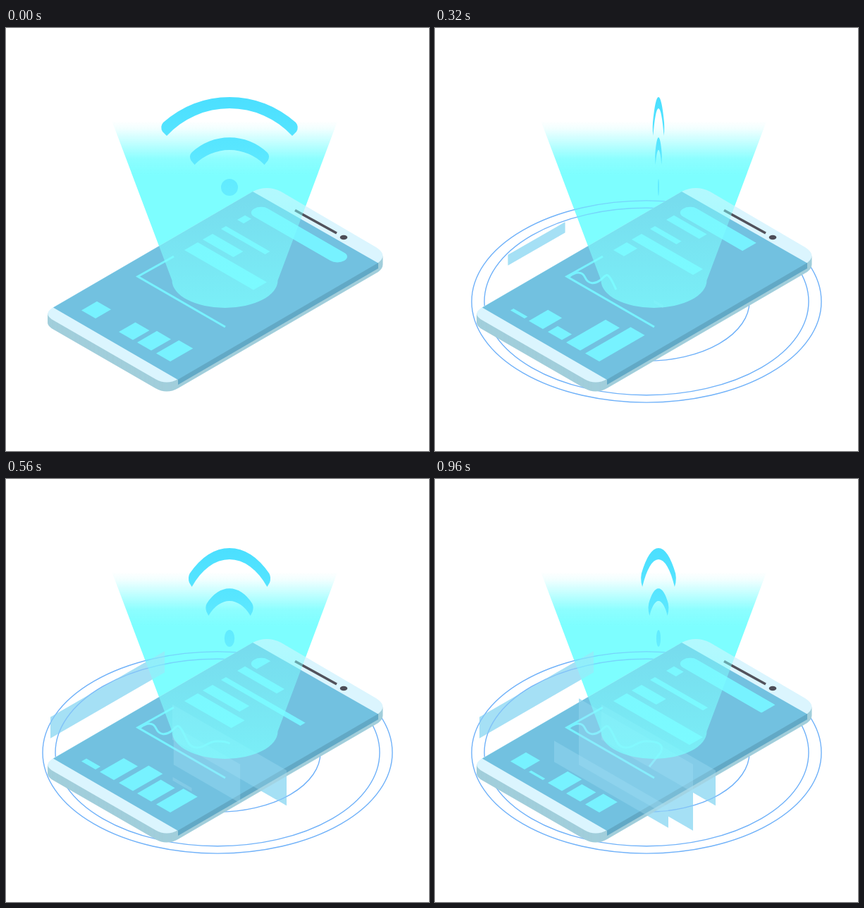
These frames come from a looping animation (600x600 px, 1 s). An HTML page with a canvas:

```html
<!DOCTYPE html>
<html lang="en">
<head>
<meta charset="utf-8">
<title>Phone hologram</title>
<style>
  html, body { margin: 0; width: 100%; height: 100%; overflow: hidden; background: #fff; }
  canvas { display: block; width: 600px; height: 600px; }
</style>
</head>
<body>
<canvas id="stage" width="600" height="600"></canvas>
<script>
const ctx = document.getElementById('stage').getContext('2d');
const LOOP = 1000, STEP = 40, SLOPE = 0.577;
const GLOW = '#77f2ff', PANEL = '#a5dff4';

const clamp = v => Math.max(0, Math.min(1, v));
// Every part that pops in takes 240 ms
const pop = (t, start) => clamp((t - start) / 240);

// Periodic: rise 400 ms, hold 200 ms, fall 400 ms
function wave(t, start, min, max) {
  const p = (t - start + LOOP) % LOOP;
  return min + (max - min) * Math.min(1, p / 400, (LOOP - p) / 400);
}

function keyed(t, keys) {
  let i = 1;
  while (i < keys.length - 1 && t > keys[i][0]) i++;
  const [t0, a] = keys[i - 1], [t1, b] = keys[i];
  return a + (b - a) * clamp((t - t0) / (t1 - t0));
}

function poly(points, color) {
  ctx.fillStyle = color;
  ctx.beginPath();
  points.forEach(([x, y]) => ctx.lineTo(x, y));
  ctx.fill();
}

// Isometric tile: `right` runs down-right, `up` runs up-right (both in x pixels)
function tile(x, y, right, up) {
  if (right < 0.5 || up < 0.5) return;
  poly([[x, y], [x + up, y - up * SLOPE],
        [x + up + right, y + (right - up) * SLOPE],
        [x + right, y + right * SLOPE]], GLOW);
}

function line(path, width, color) {
  ctx.lineWidth = width;
  ctx.strokeStyle = color;
  ctx.stroke(new Path2D(path));
}

function fade(y0, y1, stops) {
  const g = ctx.createLinearGradient(0, y0, 0, y1);
  stops.forEach(([at, color]) => g.addColorStop(at, color));
  return g;
}

const beamTone = a => `rgba(125,254,255,${a})`;
const beam = new Path2D('M149.5 130L235.5 358A75 39 0 0 0 385.5 358L471 130Z');
const beamBase = fade(132, 208, [[0, beamTone(0)], [0.14, beamTone(0.1)], [0.7, beamTone(0.88)], [1, beamTone(1)]]);
const beamVeil = fade(205, 397, [[0, beamTone(0.4)], [0.2, beamTone(0.45)], [1, beamTone(0.75)]]);
const iconFill = fade(98, 240, [[0, '#4bdfff'], [1, '#65edff']]);

// Upright panels: centre, height, lean, start time
const panels = [
  [144, 306, 30, -1, 200],
  [317, 391.5, 50, 1, 300],
  [285, 405, 94, 1, 420],
  [250, 433, 30, 1, 520]
];

function drawPanels(t, alpha) {
  ctx.globalAlpha = alpha;
  for (const [x, y, height, lean, start] of panels) {
    const k = pop(t, start), w = 81 * k, h = height / 2 * k, d = w * SLOPE * lean;
    if (k) poly([[x - w, y - d - h], [x + w, y + d - h], [x + w, y + d + h], [x - w, y - d + h]], PANEL);
  }
  ctx.globalAlpha = 1;
}

function drawRings(t) {
  const k = pop(t, 0);
  if (!k) return;
  ctx.lineWidth = 1.4 * k;
  ctx.strokeStyle = '#6fb1f9';
  for (const r of [248, 230, 146]) {
    ctx.beginPath();
    ctx.ellipse(300, 388, r * k, r * k * SLOPE, 0, 0, 7);
    ctx.stroke();
  }
}

const face = new Path2D('M67 396L350 232Q370 222 390 232L525 311Q542 322 528 333L244 498Q228 507 212 498L68 415Q51 406 67 396Z');

function drawPhone() {
  ctx.fillStyle = '#a1cedb';
  for (let d = 13; d > 0; d--) {
    ctx.save();
    ctx.translate(0, d);
    ctx.fill(face);
    ctx.restore();
  }
  ctx.fillStyle = '#dbf5fe';
  ctx.fill(face);
  poly([[67, 396.5], [350, 232], [528, 333.5], [244, 499]], '#72c1e0');
  poly([[244, 498.5], [528, 333], [528, 341], [244, 506]], '#62a9c6');
  line('M410 258.5L469 291', 3.6, '#52525c');
  ctx.fillStyle = '#4d4d57';
  ctx.beginPath();
  ctx.ellipse(479, 297, 5.3, 3.2, 0, 0, 7);
  ctx.fill();
}

function drawPill(t) {
  const cut = wave(t, 600, 0, 155);
  ctx.save();
  ctx.transform(0.866, 0.5, 0.866, -0.5, 342, 262);
  ctx.beginPath();
  ctx.rect(0, 0, cut, 23);
  ctx.clip();
  ctx.fillStyle = GLOW;
  ctx.beginPath();
  ctx.roundRect(0, 0, 147.7, 23, 11.5);
  ctx.fill();
  ctx.restore();
}

function drawScreen(t) {
  drawPill(t);
  tile(328, 272, wave(t, 0, 9, 56), 11);
  tile(305, 285, wave(t, 200, 0, 125), 7);
  tile(279, 300, wave(t, 800, 0, 87), 14);
  tile(253, 315, keyed(t, [[0, 98], [240, 15], [400, 15], [720, 118], [920, 118], [1000, 98]]), 19);

  tile(107, 400.5, 20, keyed(t, [[0, 22], [400, 0], [900, 22]]));
  tile(133, 415.5, 20, wave(t, 0, 0, 34));
  tile(160, 431, 20, wave(t, 200, 0, 47));
  tile(186, 446, 20, wave(t, 800, 0, 56));
  tile(213, 461.5, 20, wave(t, 800, 0, 64.5));

  line('M238 324L187 352.5L311 424', 3, GLOW);
  if (t) {
    ctx.setLineDash([Math.min(215, t * 0.28), 999]);
    line('M190 353C200 345 209 345 213 354S226 364 234 358S243 345 250 357S258 380 270 381S285 372 300 372S326 376 320 388L304 408', 3, GLOW);
    ctx.setLineDash([]);
  }
}

// Signal arcs and dot, centred on x = 0
const icon = new Path2D(
  'M-89 153L-95 147Q-99 140 -94 134A140.7 140.7 0 0 1 94 134Q99 140 95 147L89 153A121 121 0 0 0 -89 153Z' +
  'M-49.5 194L-54.5 188Q-58 181 -53.5 176.5A78 78 0 0 1 53.5 176.5Q58 181 54.5 188L49.5 194A69 69 0 0 0 -49.5 194Z' +
  'M-12 226A12 12 0 0 1 12 226A12 12 0 0 1 -12 226Z');

function drawIcon(t) {
  ctx.save();
  ctx.translate(317, 0);
  ctx.scale(Math.abs(t - 700) / 350 - 1, 1);
  ctx.fillStyle = iconFill;
  ctx.fill(icon);
  ctx.restore();
}

function draw(t) {
  ctx.clearRect(0, 0, 600, 600);
  ctx.fillStyle = beamBase;
  ctx.fill(beam);
  drawPanels(t, 1);
  drawRings(t);
  drawPhone();
  drawScreen(t);
  drawPanels(t, 0.33);
  ctx.save();
  ctx.beginPath();
  ctx.rect(0, 205, 600, 395);
  ctx.clip();
  ctx.fillStyle = beamVeil;
  ctx.fill(beam);
  ctx.restore();
  drawIcon(t);
}

const begin = performance.now();
function tick() {
  const t = (performance.now() - begin) % LOOP;
  draw(Math.floor(t / STEP) * STEP);
  requestAnimationFrame(tick);
}
tick();
</script>
</body>
</html>
```
